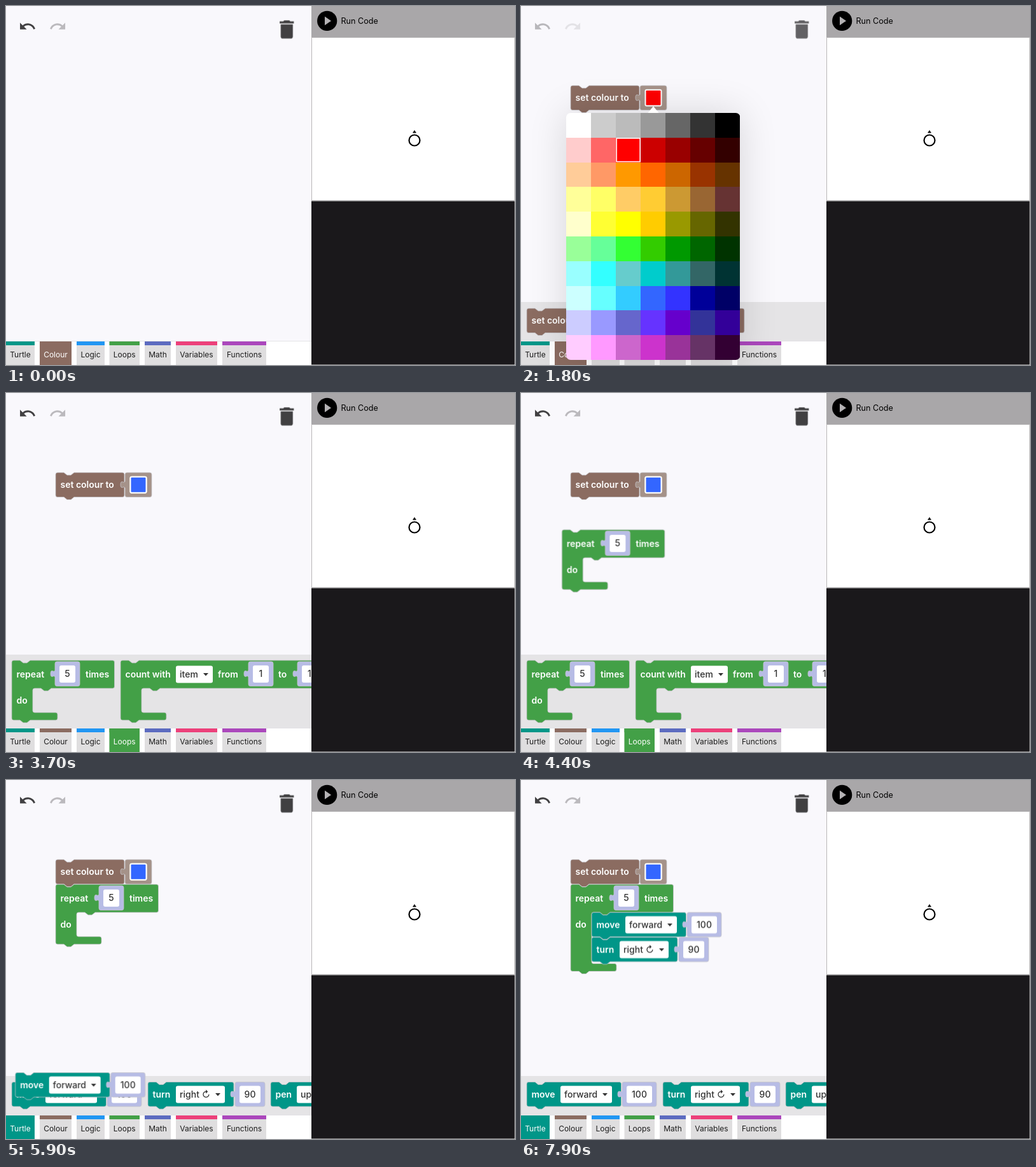
An HTML page that plays this animation: 800 px wide and 564 px high, repeating every 8 s.

```html
<!DOCTYPE html>
<html lang="en">
<head>
<meta charset="utf-8">
<title>Block coding</title>
<style>
  html, body { margin: 0; width: 100%; height: 100%; overflow: hidden; background: #fff; }
  svg { display: block; }
  text { font-family: Inter, "DejaVu Sans", sans-serif; font-size: 14px; font-weight: 600; fill: #fff; }
  text.field { font-weight: 500; fill: #333; }
  text.tab { font-size: 12px; font-weight: 400; fill: #1c1c1c; text-anchor: middle; }
  text.tab.on { fill: #fff; }
  text.run { font-size: 12.6px; font-weight: 400; fill: #000; }
  .shape { stroke: #c6c4c9; stroke-width: .8; }
</style>
</head>
<body>
<script>
(() => {
const LOOP = 8000, TICK = 100;
const COLOURS = {
  Turtle: '#009688', Colour: '#8b6c61', Logic: '#2196f3', Loops: '#43a047',
  Math: '#5c6bc0', Variables: '#ec407a', Functions: '#ab47bc'
};
const PALE_BROWN = '#a59289', LAVENDER = '#b7bce5';
const RED = '#f00', BLUE = '#36f', INK = '#414042';

// ---- SVG helpers ----
function add(parent, tag, attrs = {}, text) {
  const el = document.createElementNS('http://www.w3.org/2000/svg', tag);
  for (const key in attrs) el.setAttribute(key, attrs[key]);
  if (text) el.textContent = text;
  parent.appendChild(el);
  return el;
}
const rect = (p, x, y, width, height, fill, more) =>
  add(p, 'rect', { x, y, width, height, fill, ...more });
const group = (p, x = 0, y = 0) => add(p, 'g', { transform: `translate(${x} ${y})` });
const label = (p, x, y, str) => add(p, 'text', { x, y }, str);
const shape = (p, d, fill) => add(p, 'path', { d, fill, class: 'shape' });

// ---- Animation helpers: values hold for one tick ----
function track(el, prop, points) {
  const last = points[points.length - 1];
  const all = [...points, [LOOP, last[1]]];
  if (all[0][0] > 0) all.unshift([0, all[0][1]]);
  el.animate(all.map(([t, v], i) => {
    const ticks = i < all.length - 1 ? Math.round((all[i + 1][0] - t) / TICK) : 0;
    return { offset: t / LOOP, [prop]: v, easing: ticks ? `steps(${ticks})` : 'linear' };
  }), { duration: LOOP, iterations: Infinity });
}
function show(el, from, to = LOOP) {
  const points = [[0, from > 0 ? 0 : 1]];
  if (from > 0) points.push([from, 0], [from, 1]);
  if (to < LOOP) points.push([to, 1], [to, 0]);
  track(el, 'opacity', points);
}
const at = (x, y) => `translate(${x}px, ${y}px)`;
function drag(el, start, end, [x0, y0], [x1, y1]) {
  const n = (end - start) / TICK, points = [];
  for (let i = 0; i <= n; i++) {
    const u = i / n, k = u * u * (3 - 2 * u);
    points.push([start + i * TICK, at(x0 + (x1 - x0) * k, y0 + (y1 - y0) * k)]);
  }
  track(el, 'transform', points);
  show(el, start);
}

// ---- Block outlines ----
const NOTCH = 'H13l5 4h6l5-4', NUB = 'H29l-5 4h-6l-5-4';
const topEdge = w => `M0 3Q0 0 3 0${NOTCH}H${w - 3}Q${w} 0 ${w} 3`;
const bottomEdge = (w, h) => `V${h - 3}Q${w} ${h} ${w - 3} ${h}${NUB}H3Q0 ${h} 0 ${h - 3}z`;
const statement = (w, h = 38.5) => topEdge(w) + bottomEdge(w, h);
function loopShape(w, inner) {
  const y = 44 + inner;
  return `${topEdge(w)}V41Q${w} 44 ${w - 3} 44H62l-5 4h-6l-5-4H36Q33 44 33 47` +
    `V${y - 3}Q33 ${y} 36 ${y}H69Q72 ${y} 72 ${y + 3}${bottomEdge(72, y + 12)}`;
}
const valueShape = (w, h = 38.5) =>
  `M3 0H${w - 3}Q${w} 0 ${w} 3V${h - 3}Q${w} ${h} ${w - 3} ${h}H3Q0 ${h} 0 ${h - 3}` +
  'V24q-1-2-3-1q-4 2-4-4q0-6 4-4q2 1 3-1V3Q0 0 3 0z';

// ---- Block parts ----
function swatch(p, x, fill) {
  return rect(p, x, 6.8, 25, 25, fill, { rx: 2, stroke: '#fff', 'stroke-width': 2 });
}
function number(p, x, y, w, str) {
  const g = group(p, x, y);
  shape(g, valueShape(w), LAVENDER);
  rect(g, 7, 6, w - 14, 27, '#fff', { rx: 3 });
  add(g, 'text', { x: w / 2, y: 24.3, class: 'field', 'text-anchor': 'middle' }, str);
}
function dropdown(p, x, y, w, str) {
  rect(p, x, y, w, 27, '#fff', { rx: 3 });
  add(p, 'text', { x: x + 6, y: y + 18.2, class: 'field' }, str);
  add(p, 'path', { d: `M${x + w - 15} ${y + 11.5}h8l-4 4.5z`, fill: '#333' });
}

// ---- Blocks ----
function setColour(p, x, y) {
  const g = group(p, x, y);
  shape(g, statement(108), COLOURS.Colour);
  label(g, 7.5, 24.2, 'set colour to');
  shape(group(g, 109, 0), valueShape(42), PALE_BROWN);
  swatch(g, 117.5, RED);
  return g;
}
function repeat(p, x, y, inners = [38]) {
  const g = group(p, x, y);
  g.bodies = inners.map(inner => shape(g, loopShape(161.5, inner), COLOURS.Loops));
  label(g, 7.5, 27, 'repeat');
  number(g, 68, 2, 39, '5');
  label(g, 116, 27, 'times');
  label(g, 7.5, 68, 'do');
  return g;
}
function count(p, x, y) {
  const g = group(p, x, y);
  shape(g, loopShape(420, 38), COLOURS.Loops);
  label(g, 7.5, 27, 'count with');
  dropdown(g, 87, 8.5, 58, 'item');
  label(g, 153, 27, 'from');
  number(g, 201, 2, 39, '1');
  label(g, 248, 27, 'to');
  number(g, 278, 2, 47, '10');
}
function move(p, x, y) {
  const g = group(p, x, y);
  shape(g, statement(148.5), COLOURS.Turtle);
  label(g, 7.5, 24.2, 'move');
  dropdown(g, 53, 6, 81, 'forward');
  number(g, 150, 0, 54, '100');
  return g;
}
function turn(p, x, y) {
  const g = group(p, x, y);
  shape(g, statement(135), COLOURS.Turtle);
  label(g, 7.5, 24.2, 'turn');
  dropdown(g, 44, 6, 77, 'right ↻');
  number(g, 137, 0, 47, '90');
  return g;
}
function pen(p, x, y) {
  const g = group(p, x, y);
  shape(g, statement(120), COLOURS.Turtle);
  label(g, 7.5, 24.2, 'pen');
  dropdown(g, 41, 6, 60, 'up');
}

// ---- Key moments ----
const TO_LOOPS = 3000, TO_TURTLE = 5100, MOVE_IN = 6500, TURN_IN = 7700;
const PICKED = 2200;

const stage = add(document.body, 'svg', { width: 800, height: 564, viewBox: '0 0 800 564' });
rect(stage, 0, 0, 800, 564, '#fff');

// ---- Workspace ----
const work = add(stage, 'svg', { width: 480, height: 526, overflow: 'hidden' });
rect(work, 0, 0, 480, 526, '#f9f8fc');

const UNDO = 'M12.5 8c-2.65 0-5.05.99-6.9 2.6L2 7v9h9l-3.62-3.62c1.39-1.16 3.16-1.88 5.12-1.88 ' +
  '3.54 0 6.55 2.31 7.6 5.5l2.37-.78C21.08 11.03 17.15 8 12.5 8z';
const BIN = 'M6 19c0 1.1.9 2 2 2h8c1.1 0 2-.9 2-2V7H6v12zM19 4h-3.5l-1-1h-5l-1 1H5v2h14V4z';
const arrows = group(work), bin = group(work);
add(arrows, 'path', { d: UNDO, fill: INK, transform: 'translate(19.7 18) scale(1.17)' });
add(arrows, 'path', { d: UNDO, fill: '#bbb9bd', transform: 'translate(95.4 18) scale(-1.17 1.17)' });
add(bin, 'path', { d: BIN, fill: INK, transform: 'translate(422.2 17.8) scale(1.59)' });
const dim = low => [[1500, 1], [1800, low], [2300, low], [2400, .92], [2600, 1]];
track(arrows, 'opacity', dim(.35));
track(bin, 'opacity', dim(.82));

// ---- Flyout ----
const flyout = group(work);
rect(flyout, 0, 0, 480, 160, '#e5e4e6');
track(flyout, 'transform', [
  [100, 526], [200, 500], [300, 474], [400, 465], [TO_LOOPS, 465], [3100, 445], [3200, 420], [3300, 411],
  [TO_TURTLE, 411], [5200, 421], [5300, 448], [5400, 462], [5500, 465]
].map(([t, y]) => [t, at(0, y)]));

const colourSet = group(flyout), loopSet = group(flyout), turtleSet = group(flyout);
setColour(colourSet, 9, 10);
const plain = group(colourSet, 177, 10);
shape(plain, valueShape(42), COLOURS.Colour);
swatch(plain, 8.5, RED);
const random = group(colourSet, 236, 10);
shape(random, valueShape(115), COLOURS.Colour);
label(random, 7, 24.2, 'random colour');
repeat(loopSet, 9, 9);
count(loopSet, 180, 9);
move(turtleSet, 9, 9.5);
turn(turtleSet, 223, 9.5);
pen(turtleSet, 416, 9.5);
show(colourSet, 0, TO_LOOPS);
show(loopSet, TO_LOOPS, TO_TURTLE);
show(turtleSet, TO_TURTLE);

// ---- Program being built ----
const first = setColour(work);
drag(first, 700, 1300, [9, 475], [78, 125]);
show(swatch(first, 117.5, BLUE), PICKED);

const loop = repeat(work, 0, 0, [38, 42, 80.5]);
drag(loop, 3900, 4600, [9, 420], [78, 164]);
show(loop.bodies[0], 0, MOVE_IN);
show(loop.bodies[1], MOVE_IN, TURN_IN);
show(loop.bodies[2], TURN_IN);

drag(move(work), 5800, MOVE_IN, [9, 474.5], [111, 208]);
drag(turn(work), 7100, TURN_IN, [223, 474.5], [111, 247]);

// ---- Category tabs ----
rect(stage, 0, 526, 480, 1, '#e4e3e6');
const TABS = [['Turtle', 0, 45, TO_TURTLE, LOOP], ['Colour', 53, 50, 0, TO_LOOPS], ['Logic', 111, 44],
  ['Loops', 162.5, 47.5, TO_LOOPS, TO_TURTLE], ['Math', 218, 41], ['Variables', 267, 65],
  ['Functions', 340, 69]];
for (const [name, x, w, from, to] of TABS) {
  const mid = x + w / 2;
  rect(stage, x, 527, w, 37, '#dfdedf');
  rect(stage, x, 527, w, 6, COLOURS[name]);
  add(stage, 'text', { x: mid, y: 552.3, class: 'tab' }, name);
  if (from === undefined) continue;
  const on = group(stage);
  rect(on, x, 527, w, 37, COLOURS[name]);
  add(on, 'text', { x: mid, y: 552.3, class: 'tab on' }, name);
  show(on, from, to);
}

// ---- Colour picker ----
const PALETTE = `fff ccc bbb 999 666 333 000 fcc f66 f00 c00 900 600 300
  fc9 f96 f90 f60 c60 930 630 ff9 ff6 fc6 fc3 c93 963 633
  ffc ff3 ff0 fc0 990 660 330 9f9 6f9 3f3 3c0 090 060 030
  9ff 3ff 6cc 0cc 399 366 033 cff 6ff 3cf 36f 33f 009 006
  ccf 99f 66c 63f 60c 339 309 fcf f9f c6c c3c 939 636 303`.split(/\s+/);
const CELL_W = 39.07, CELL_H = 38.8;
const picker = group(stage);
rect(picker, 71, 168, 273.5, 388, '#000', { opacity: .14, style: 'filter: blur(30px)' });
const clip = add(picker, 'clipPath', { id: 'round' });
rect(clip, 71, 168, 273.5, 388, '#fff', { rx: 7 });
add(picker, 'path', { d: 'M199 168.5L208 157.5L217 168.5z', fill: '#fff' });
const grid = add(picker, 'g', { 'clip-path': 'url(#round)' });
const cellAt = i => [71 + i % 7 * CELL_W, 168 + Math.floor(i / 7) * CELL_H];
PALETTE.forEach((c, i) => {
  const [x, y] = cellAt(i);
  rect(grid, x, y, CELL_W, CELL_H, '#' + c, { 'shape-rendering': 'crispEdges' });
});
function marker(i) {
  const [x, y] = cellAt(i);
  return rect(picker, x + 1, y + 1, CELL_W - 2, CELL_H - 2, 'none', { stroke: '#fff', 'stroke-width': 1.6 });
}
show(marker(PALETTE.indexOf('f00')), 0, PICKED);
show(marker(PALETTE.indexOf('36f')), PICKED);
track(picker, 'opacity', [[1500, 0], [1800, 1], [2200, 1], [2300, .78], [2400, .46], [2500, .18], [2600, 0]]);

// ---- Run panel ----
rect(stage, 480, 0, 320, 564, '#fff');
rect(stage, 480, 0, 320, 49, '#a9a7a9');
add(stage, 'circle', { cx: 504.7, cy: 23.4, r: 15.6, fill: '#000' });
add(stage, 'path', { d: 'M501 16.5L511 23.4L501 30.3z', fill: '#b4b2b4' });
add(stage, 'text', { x: 526.5, y: 28.2, class: 'run' }, 'Run Code');
rect(stage, 480.5, 49.5, 319, 256, '#fff', { stroke: '#b9b7b8' });
rect(stage, 480, 306.5, 319.5, 257, '#1a181b');
add(stage, 'circle', { cx: 642, cy: 211, r: 8.5, fill: 'none', stroke: '#000', 'stroke-width': 2.2 });
add(stage, 'path', { d: 'M639 199.5L642 195L645 199.5z', fill: '#000' });
})();
</script>
</body>
</html>
```
